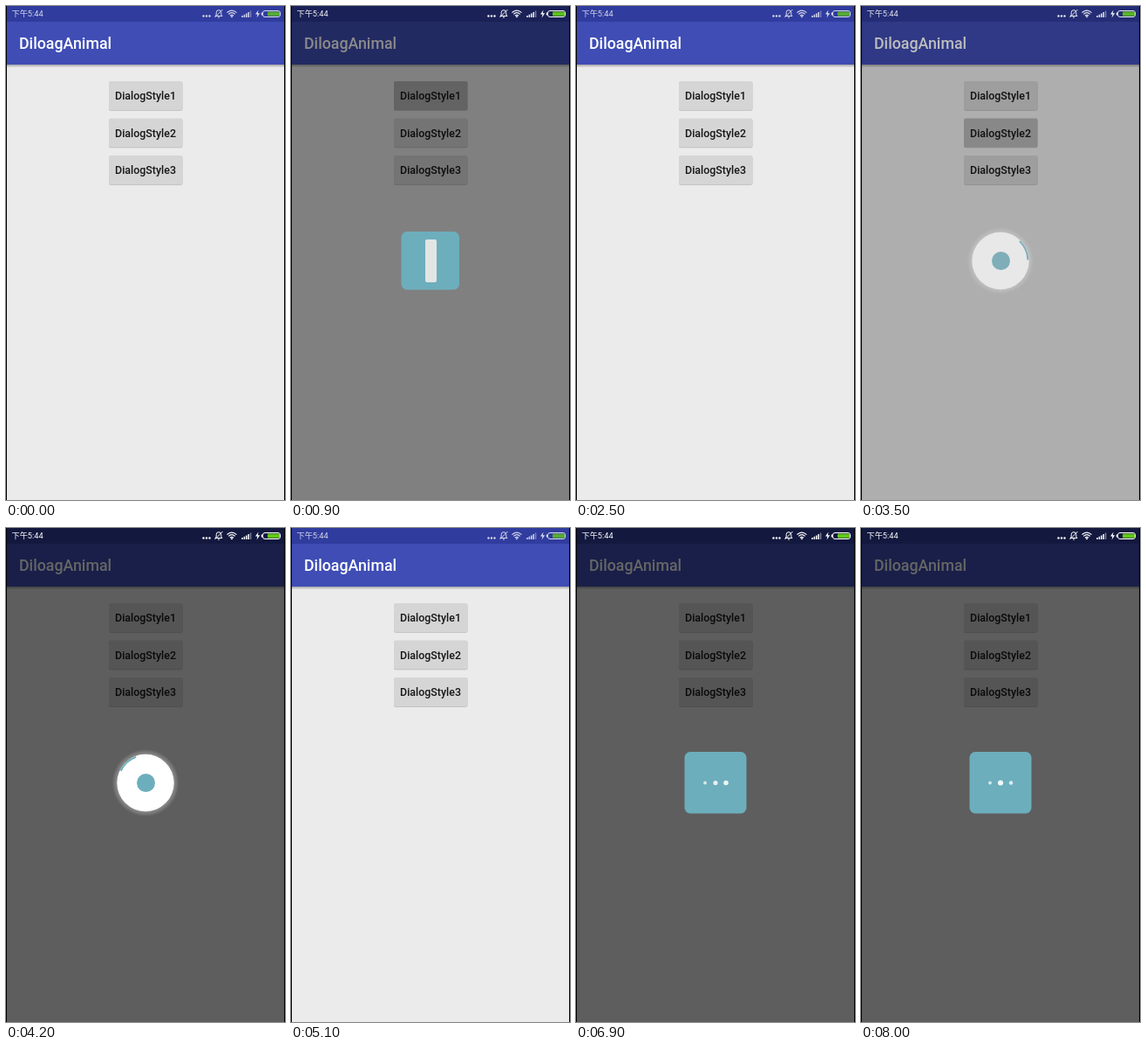
Recreate the animation shown at these times as an HTML page. Size 320 px wide and 565 px high, loop 8100 ms.

```html
<!DOCTYPE html>
<html lang="en">
<head>
<meta charset="utf-8">
<title>Dialog styles</title>
<style>
html, body { margin: 0; width: 100%; height: 100%; overflow: hidden; background: #000; }
svg { display: block; width: 100vw; height: 100vh; }
text { font-family: Roboto, "Noto Sans CJK SC", "Noto Sans CJK", sans-serif; }
.label { font-size: 12.44px; font-weight: 500; fill: #161616; text-anchor: middle; }
.line { fill: none; stroke: #fff; }
</style>
</head>
<body>
<svg viewBox="0 0 320 565">
  <defs>
    <linearGradient id="shade" x2="0" y2="1">
      <stop stop-color="#000" stop-opacity=".3"/>
      <stop offset="1" stop-color="#000" stop-opacity="0"/>
    </linearGradient>
    <radialGradient id="halo">
      <stop offset=".84" stop-color="#fff" stop-opacity=".3"/>
      <stop offset="1" stop-color="#fff" stop-opacity="0"/>
    </radialGradient>
  </defs>

  <rect width="320" height="565" fill="#ebebec"/>
  <rect width="320" height="18" fill="#303c9e"/>
  <rect y="18" width="320" height="49" fill="#3f4db5"/>
  <rect y="67" width="320" height="3.5" fill="url(#shade)"/>
  <text x="15" y="49.2" font-size="17.8" font-weight="500" fill="#fff">DiloagAnimal</text>
  <g id="buttons"></g>

  <rect id="dim" width="320" height="565"/>
  <path d="M.5 0V565M319.5 0V565" stroke="#000"/>

  <g id="status" fill="#fff">
    <text x="6.5" y="12.4" font-size="9.2">下午5:44</text>
    <circle cx="226.5" cy="11.5" r="1.2"/>
    <circle cx="230" cy="11.5" r="1.2"/>
    <circle cx="233.5" cy="11.5" r="1.2"/>
    <path class="line" d="M240 11.5H248L246.8 10V7.5A2.8 2.8 0 0 0 241.2 7.5V10ZM243 13H245M239.5 13L248.5 4"/>
    <path class="line" stroke-width="1.2" d="M253.5 7.6Q259 2.8 264.5 7.6M255.2 9.4Q259 6 262.8 9.4M257 11.2Q259 9.4 261 11.2"/>
    <circle cx="259" cy="12.3" r="1"/>
    <path class="line" stroke-width="1.5" d="M271 13V11M273.4 13V9.8M275.8 13V8.4M278.2 13V7"/>
    <path class="line" stroke-width="1.5" opacity=".45" d="M280.6 13V5.5"/>
    <path d="M289.5 4.5L286 9.6H288.4L287.6 13.5L291.2 8.2H288.8Z"/>
    <rect class="line" x="294.5" y="5.5" width="20" height="7" rx="2.5"/>
    <rect x="292.8" y="7.5" width="1.5" height="3"/>
    <rect x="300" y="6.5" width="14" height="5" rx="1" fill="#62c71c"/>
  </g>

  <g class="dialog">
    <rect x="126.5" y="258" width="66.5" height="66.5" rx="6.5" fill="#6daebc"/>
    <rect x="154" y="267" width="13" height="49" rx="2" fill="#e3e5e5"/>
  </g>
  <g class="dialog">
    <circle cx="160" cy="291.5" r="38.5" fill="url(#halo)"/>
    <circle cx="160" cy="291.5" r="32.7" fill="#fff"/>
    <circle cx="160.5" cy="291.5" r="10.5" fill="#6daebc"/>
    <path id="arc" d="M131.7 277.7A31.5 31.5 0 0 1 149.2 261.9" fill="none" stroke="#6daebc" stroke-width="2"/>
  </g>
  <g class="dialog">
    <rect x="124.5" y="256" width="71" height="70.5" rx="6.5" fill="#6daebc"/>
    <g id="dots" fill="#fff">
      <circle cx="148" cy="291.5"/><circle cx="160" cy="291.5"/><circle cx="172" cy="291.5"/>
    </g>
  </g>
</svg>
<script>
const LOOP = 8100, STEP = 100;
// press: button touched; show: dialog starts to appear; hide: it starts to fade
const runs = [
  { press: 500, show: 670, hide: 2200, fade: 300 },
  { press: 3200, show: 3370, hide: 4900, fade: 200 },
  { press: 5900, show: 6100, hide: 9000, fade: 300 }
];
const $ = id => document.getElementById(id);
const clamp = x => Math.max(0, Math.min(1, x));

$("buttons").innerHTML = runs.map((run, i) => {
  const y = 86 + i * 42.5;
  return `<rect x="118" y="${y + .8}" width="84.5" height="33" rx="2" fill="#b9b9ba"/>
    <rect x="118" y="${y}" width="84.5" height="33" rx="2" fill="#d5d5d6"/>
    <rect class="press" x="118" y="${y}" width="84.5" height="33" rx="2"/>
    <text class="label" x="160" y="${y + 21}">DialogStyle${i + 1}</text>`;
}).join("");

const dialogs = document.querySelectorAll(".dialog");
const presses = document.querySelectorAll(".press");
const dots = [...$("dots").children];

function draw(t) {
  let dim = 0;
  runs.forEach((run, i) => {
    const left = 1 - clamp((t - run.hide) / run.fade);
    const age = t - run.show;
    dim += .6 * clamp(age / 300) * left;
    dialogs[i].setAttribute("opacity", clamp(age / 180) * left);
    const held = t - run.press;
    presses[i].setAttribute("opacity", .14 * clamp((held + 100) / 200) * clamp((800 - held) / 300));
  });
  $("dim").setAttribute("opacity", dim);
  $("status").setAttribute("opacity", .8 + dim / 3);
  $("arc").setAttribute("transform", `rotate(${(t - 4200) * .36} 160 291.5)`);

  const phase = (t - 6300) / 1172;
  dots.forEach((dot, i) => {
    const swell = Math.max(0, Math.cos(2 * Math.PI * (phase - i / 3)));
    dot.setAttribute("r", 1.9 + 1.5 * swell);
    dot.setAttribute("opacity", .7 + .3 * swell);
  });
}

const start = performance.now();
function tick() {
  const t = (performance.now() - start) % LOOP;
  draw(Math.floor(t / STEP) * STEP);
  requestAnimationFrame(tick);
}
tick();
</script>
</body>
</html>
```
